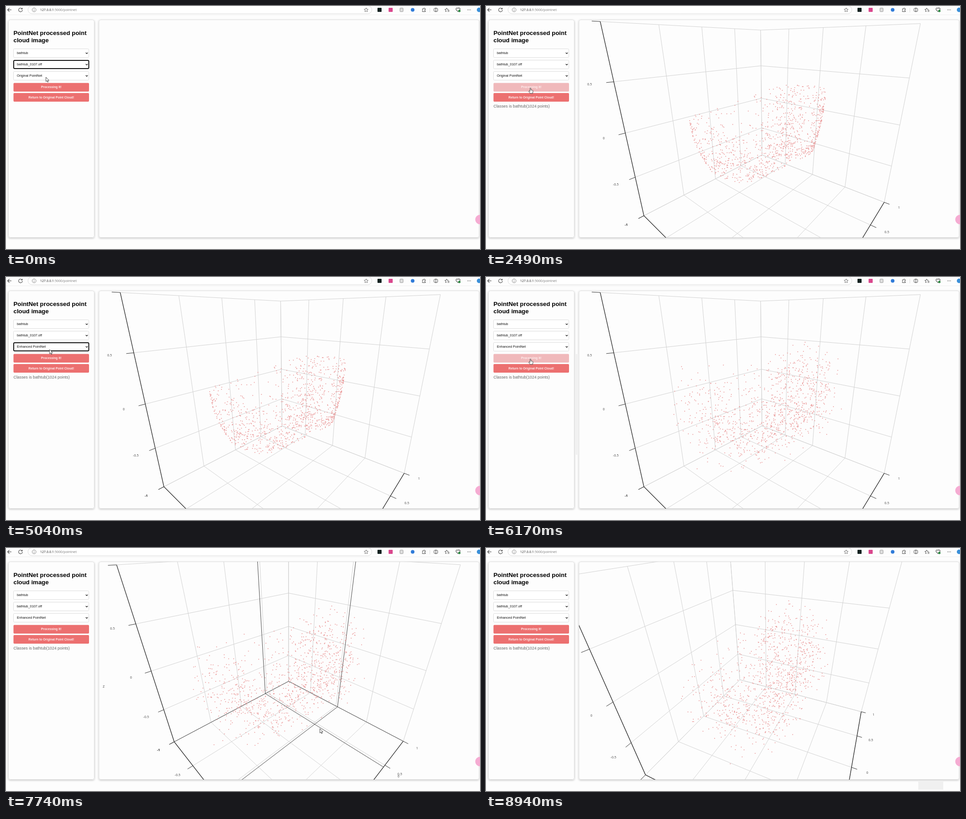
Animation, 1045 px wide and 536 px high, one loop 9.37 s. Source, as an HTML page with a canvas:

```html
<!DOCTYPE html>
<html lang="en">
<head>
<meta charset="utf-8">
<title>Point cloud viewer</title>
<style>
html, body { margin: 0; width: 100%; height: 100%; overflow: hidden; background: #fdfdfd; }
canvas { display: block; width: 100%; height: 100%; }
</style>
</head>
<body>
<canvas id="stage" width="1045" height="536"></canvas>
<script>
const ctx = document.getElementById('stage').getContext('2d');
const LOOP = 9370, STEP = 135, PHASE = 7320;
const ARIAL = '"Liberation Sans", Arial, sans-serif';
const SANS = '"Open Sans", "Noto Sans", sans-serif';
const BACK = '#fdfdfd', RED = '#ec7070', DARK = '#333';
const TICKS = [-1, -0.5, 0, 0.5, 1];
const PLOT = { x: 205, y: 30, w: 839, h: 481 };
const FOCAL = 521.4, DISTANCE = 2.433, CENTER = [623.7, 271];

// Each row: time, then the values at that time.
const CURSOR = [[0, 88, 157], [440, 88, 157], [740, 88, 163], [1020, 88, 163], [1390, 87, 168],
  [1740, 98, 181], [3600, 98, 181], [3670, 96, 160], [4400, 97, 156], [5040, 96, 160],
  [5280, 98, 181], [6500, 98, 181], [6900, 520, 325], [7320, 643, 373], [8130, 741, 424], [8670, 965, 495]];
const CAMERA = [[6780, 40.16, 20.2], [7320, 51.5, 25.8], [8130, 38.1, 32.6], [8670, 24.2, 31.8]];
const SPIKE = [[6900, -0.65, -0.6], [7320, -0.586, -0.388], [8130, -0.345, 0.443], [8670, -0.2, 0.85]];

function track(rows, t) {
  const next = rows.findIndex(row => row[0] > t);
  if (next === 0) return rows[0].slice(1);
  if (next < 0) return rows[rows.length - 1].slice(1);
  const a = rows[next - 1], b = rows[next], k = (t - a[0]) / (b[0] - a[0]);
  return a.slice(1).map((v, i) => v + (b[i + 1] - v) * k);
}

// ---- Point clouds ----
let seed = 107;
function random() {
  seed = (seed + 0x6D2B79F5) | 0;
  let n = Math.imul(seed ^ (seed >>> 15), 1 | seed);
  n = (n + Math.imul(n ^ (n >>> 7), 61 | n)) ^ n;
  return ((n ^ (n >>> 14)) >>> 0) / 4294967296;
}
const squarish = v => Math.sign(v) * Math.abs(v) ** 0.55;
const noise = () => (random() + random() + random() - 1.5) * 0.2;

// A rounded box open at the top, with more points towards its far end.
const tub = Array.from({ length: 1024 }, () => {
  const turn = random() * 2 - 1, depth = random(), onFloor = random() < 0.25;
  const angle = Math.PI * (1 + turn * Math.abs(turn) ** 0.25);
  const shrink = onFloor ? Math.sqrt(random()) * 0.82 : 1 - 0.18 * depth ** 2;
  const along = shrink * squarish(Math.cos(angle));
  const top = 0.29 - 0.05 * along, bottom = -0.33 + 0.08 * along;
  return [0.8 * along, 0.33 * shrink * squarish(Math.sin(angle)),
    onFloor ? bottom : top + (bottom - top) * depth];
});
const noisyTub = tub.map(p => p.map(v => v + noise()));

// ---- Drawing helpers ----
function text(str, x, y, font, color, align = 'left') {
  ctx.font = font;
  ctx.fillStyle = color;
  ctx.textAlign = align;
  ctx.textBaseline = 'middle';
  ctx.fillText(str, x, y);
}
function box(x, y, w, h, radius, fill, stroke, width = 1) {
  ctx.beginPath();
  ctx.roundRect(x, y, w, h, radius);
  paint(fill, stroke, width);
}
function circle(x, y, r, fill, stroke, width) {
  ctx.beginPath();
  ctx.arc(x, y, r, 0, Math.PI * 2);
  paint(fill, stroke, width);
}
function shape(d, x, y, fill, stroke, width) {
  ctx.save();
  ctx.translate(x, y);
  const path = new Path2D(d);
  if (fill) { ctx.fillStyle = fill; ctx.fill(path); }
  if (stroke) { ctx.strokeStyle = stroke; ctx.lineWidth = width || 1; ctx.stroke(path); }
  ctx.restore();
}
function paint(fill, stroke, width = 1) {
  if (fill) { ctx.fillStyle = fill; ctx.fill(); }
  if (stroke) { ctx.strokeStyle = stroke; ctx.lineWidth = width; ctx.stroke(); }
}

// ---- Browser bar ----
const STAR = 'M0 -4.5L1.3 -1.5L4.5 -1.2L2.1 .9L2.8 4.1L0 2.4L-2.8 4.1L-2.1 .9L-4.5 -1.2L-1.3 -1.5Z';
function drawBrowser() {
  const ink = '#444';
  ctx.fillStyle = '#efefef';
  ctx.fillRect(0, 19, 1045, 1);
  box(48.5, -0.5, 758, 17.5, 9, '#fff', '#dcdcdc');
  shape('M4.5 0H-4M0 -4L-4 0L0 4', 7.5, 8.5, null, ink, 1.1);
  shape('M3.2 -2.6A4.2 4.2 0 1 0 4.2 .4M3.9 -4.6V-1.8H1', 32, 8.5, null, ink, 1.1);
  circle(62, 8.5, 4.3, null, '#777', 0.9);
  shape('M0 -.6V2.5M0 -2.4V-1.5', 62, 8.5, null, '#777', 0.9);
  const font = '7.28px ' + SANS;
  text('127.0.0.1', 75, 8.7, font, '#222');
  const hostWidth = ctx.measureText('127.0.0.1').width;
  text(':5000/pointnet', 75 + hostWidth, 8.7, font, '#777');
  shape(STAR, 794, 8.5, null, '#666', 0.9);
  box(819, 4, 9, 9, 1, '#10211f');
  box(843.5, 4, 9, 9, 1, '#d9468c');
  box(868.5, 4.5, 7, 8, 1, '#ddd', '#888', 0.8);
  circle(896.5, 8.5, 4, '#2f7bd8');
  shape('M-3.5 -2.5H-1A1.4 1.4 0 1 1 1.7 -2.5H3.2V-.8A1.4 1.4 0 1 0 3.2 1.8V3.6H-3.5V1.6A1.4 1.4 0 0 0 -3.5 -.8Z', 921.5, 8.8, null, ink, 1);
  ctx.fillStyle = '#ddd';
  ctx.fillRect(934, 4, 1, 10);
  box(943.7, 5, 8, 7, 1.5, null, ink, 1);
  shape('M0 -4.8V4.8', 947.7, 8.5, null, ink, 1);
  shape('M-1 -4L.2 -1.4L3 -1.2M-1 -4L-2.2 -1.4L-5 -1L-3 1L-3.4 3.8L-1 2.4M1 1H5M1 3.4H5', 972.5, 8.5, null, ink, 1);
  shape('M0 4L-4 0A2.3 2.3 0 0 1 0 -3A2.3 2.3 0 0 1 4 0Z', 996.5, 8.3, null, ink, 1.1);
  circle(999.5, 10.8, 2.6, '#2f8b45');
  for (let i = -1; i < 2; i++) circle(1021 + i * 3, 8.5, 0.8, ink);
  circle(1043, 8.5, 5, '#3a8fd8');
}

// ---- Side panel ----
function panel(x, w) {
  ctx.save();
  ctx.shadowColor = 'rgba(0,0,0,.22)';
  ctx.shadowBlur = 4;
  ctx.shadowOffsetY = 1.5;
  box(x, 30, w, 481, 4, BACK);
  ctx.restore();
  box(x + 0.5, 30.5, w - 1, 480, 4, null, '#e0e0e0');
}
function select(label, y, focused) {
  if (focused) box(17, y - 9, 165.5, 18, 2, '#fff', '#111', 2);
  else box(16.5, y - 9.5, 166, 19, 2, '#fff', '#ddd');
  text(label, 24, y + 0.3, '7.4px ' + ARIAL, '#111');
  shape('M-2.3 -1.1L0 1.2L2.3 -1.1', 178, y, null, '#111', 1.3);
}
function button(label, y, color) {
  box(16.5, y - 9.5, 166.5, 19, 2, color);
  text(label, 99.8, y + 0.3, 'bold 6.83px ' + ARIAL, '#fdeeee', 'center');
}
function drawSidePanel(t, hover) {
  panel(5, 190);
  const heading = 'bold 13.3px ' + ARIAL;
  text('PointNet processed point', 16.5, 60.7, heading, '#000');
  text('cloud image', 16.5, 76.3, heading, '#000');
  select('bathtub', 104, false);
  select('bathtub_0107.off', 129, t < 590);
  select(t < 5040 ? 'Original PointNet' : 'Enhanced PointNet', 154,
    (t >= 590 && t < 2090) || (t >= 4740 && t < 5320));
  button('Processing It!', 179.3, hover ? '#f0b9bb' : RED);
  button('Return to Original Point Cloud!', 201.5, RED);
  if (t >= 2090 && (t < 5320 || t >= 5470)) {
    text('Classes is bathtub(1024 points)', 16.5, 221.7, '8.85px ' + ARIAL, '#666');
  }
}

// ---- 3D plot ----
function makeProjection(yawDegrees, pitchDegrees) {
  const yaw = Math.PI * (1 + yawDegrees / 180), pitch = pitchDegrees * Math.PI / 180;
  const fx = Math.cos(yaw), fy = Math.sin(yaw), s = Math.sin(pitch), c = Math.cos(pitch);
  return ([x, y, z]) => {
    const ahead = x * fx + y * fy;
    const scale = FOCAL / (DISTANCE + c * ahead - s * z);
    return [CENTER[0] + scale * (x * fy - y * fx), CENTER[1] - scale * (s * ahead + c * z)];
  };
}
function drawPlot(t, time) {
  const project = makeProjection(...track(CAMERA, time));
  const line = (a, b, color, width) => {
    ctx.beginPath();
    ctx.moveTo(...project(a));
    ctx.lineTo(...project(b));
    paint(null, color, width);
  };
  const label = (str, at, bold) => {
    const [x, y] = project(at);
    text(str, x, y, (bold ? 'bold ' : '') + '7.3px ' + SANS, bold ? '#222' : '#444', 'center');
  };
  ctx.save();
  ctx.beginPath();
  ctx.rect(PLOT.x, PLOT.y, PLOT.w, PLOT.h);
  ctx.clip();

  for (const g of TICKS) {
    for (const [a, b] of [
      [[g, -1, -1], [g, 1, -1]], [[-1, g, -1], [1, g, -1]],
      [[g, -1, -1], [g, -1, 1]], [[1, -1, g], [-1, -1, g]],
      [[-1, g, -1], [-1, g, 1]], [[-1, -1, g], [-1, 1, g]]
    ]) line(a, b, '#d2d2d2', 1);
  }
  line([1, -1, -1], [1, -1, 1], DARK, 1.4);
  line([1, -1, -1], [1, 1, -1], DARK, 1.4);
  line([-1, 1, -1], [1, 1, -1], DARK, 1.4);

  for (const g of TICKS) {
    line([1, -1, g], [1.06, -1, g], DARK, 1);
    line([1, g, -1], [1.06, g, -1], DARK, 1);
    line([g, 1, -1], [g, 1.06, -1], DARK, 1);
    label(String(g), [1.185, -1, g], g === -1);
    if (g > -1) label(String(g), [1.17, g, -1]);
    label(String(-g), [g, 1.165, -1]);
  }
  label('Z', [1.41, -1, 0]);
  label('X', [1.41, 0, -1]);
  label('Y', [0, 1.41, -1]);

  if (time >= 6900 && time < 8600) {
    const [x, y] = track(SPIKE, time);
    for (const [a, b] of [
      [[1, -1, -1], [-1, -1, -1]], [[-1, -1, -1], [-1, 1, -1]],
      [[x, -1, -1], [x, 1, -1]], [[-1, y, -1], [1, y, -1]],
      [[x, -1, -1], [x, -1, 1]], [[-1, y, -1], [-1, y, 1]]
    ]) line(a, b, '#444', 1);
    label(y.toFixed(0), [1.17, y, -1]);
    label((-x).toFixed(0), [x, 1.165, -1]);
  }

  ctx.fillStyle = '#ea9797';
  for (const p of t < 5780 ? tub : noisyTub) {
    const [x, y] = project(p);
    ctx.fillRect(x - 0.85, y - 0.85, 1.7, 1.7);
  }
  ctx.restore();
}

// ---- Mouse pointer ----
const ARROW = 'M0 0V9.6L2.3 7.6L3.8 11L5.3 10.3L3.8 7.1H6.8Z';
const HAND = 'M-1 .8A1 1 0 0 1 1 .8V4.2L4.6 5A1.3 1.3 0 0 1 5.6 6.4L4.8 11.8H-.6L-3.6 7.8A.9 .9 0 0 1 -2.2 6.6L-1 7.6Z';

function draw(t) {
  const time = PHASE + Math.floor((t - PHASE) / STEP) * STEP;
  const [x, y] = track(CURSOR, time);
  const hover = x < 183 && y >= 170 && y < 189;
  ctx.fillStyle = BACK;
  ctx.fillRect(0, 0, 1045, 536);
  drawBrowser();
  drawSidePanel(t, hover);
  panel(PLOT.x - 0.5, PLOT.w);
  if (t >= 2490) drawPlot(t, time);
  if (t >= 6020 && t < 6630) {
    ctx.fillStyle = '#f1f1f1';
    ctx.fillRect(196, 170, 8, 222);
  }
  circle(1045, 471, 10.5, '#f5acd2');
  if (t >= 8790) {
    ctx.fillStyle = '#f0f0f0';
    ctx.fillRect(953, 513, 55, 20);
  } else {
    shape(hover ? HAND : ARROW, x, y, '#fff', '#333', 0.9);
  }
}

const start = performance.now();
function tick() {
  draw((performance.now() - start) % LOOP);
  requestAnimationFrame(tick);
}
tick();
</script>
</body>
</html>
```
